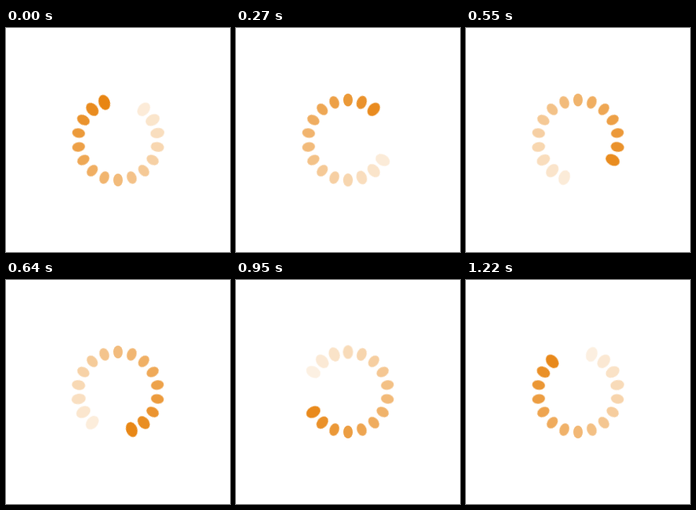
An HTML page for the animation above (1250 ms loop, 280 by 280 pixels).

```html
<!DOCTYPE html>
<html lang="en">
<head>
<meta charset="utf-8">
<title>Spinner</title>
<style>
  html, body { margin: 0; width: 100%; height: 100%; overflow: hidden; background: #fff; }
  svg { display: block; width: 100vw; height: 100vh; }
  ellipse {
    fill: #e88512;
    transform-box: fill-box;
    transform-origin: center;
    animation: fade 1250ms linear infinite, swell 1250ms linear infinite;
  }
  /* Faint dots drop out before they reach zero. */
  @keyframes fade {
    0% { opacity: 1; }
    87.5% { opacity: .125; }
    87.51%, 100% { opacity: 0; }
  }
  @keyframes swell {
    0% { transform: scale(1.2); }
    5% { transform: scale(1.15); }
    13%, 64% { transform: scale(1); }
    80%, 100% { transform: scale(1.17); }
  }
</style>
</head>
<body>
<svg viewBox="0 0 280 280"></svg>
<script>
  const COUNT = 18, PERIOD = 1250;
  const svg = document.querySelector('svg');

  function add(parent, name, attrs) {
    const el = document.createElementNS('http://www.w3.org/2000/svg', name);
    for (const key in attrs) el.setAttribute(key, attrs[key]);
    return parent.appendChild(el);
  }

  for (let i = 0; i < COUNT; i++) {
    const arm = add(svg, 'g', { transform: `rotate(${i * 360 / COUNT} 140 140)` });
    const dot = add(arm, 'ellipse', { cx: 140, cy: 90, rx: 5.9, ry: 8.1 });
    dot.style.animationDelay = `${-(COUNT - 1 - i) * PERIOD / COUNT}ms`;
  }
</script>
</body>
</html>
```
